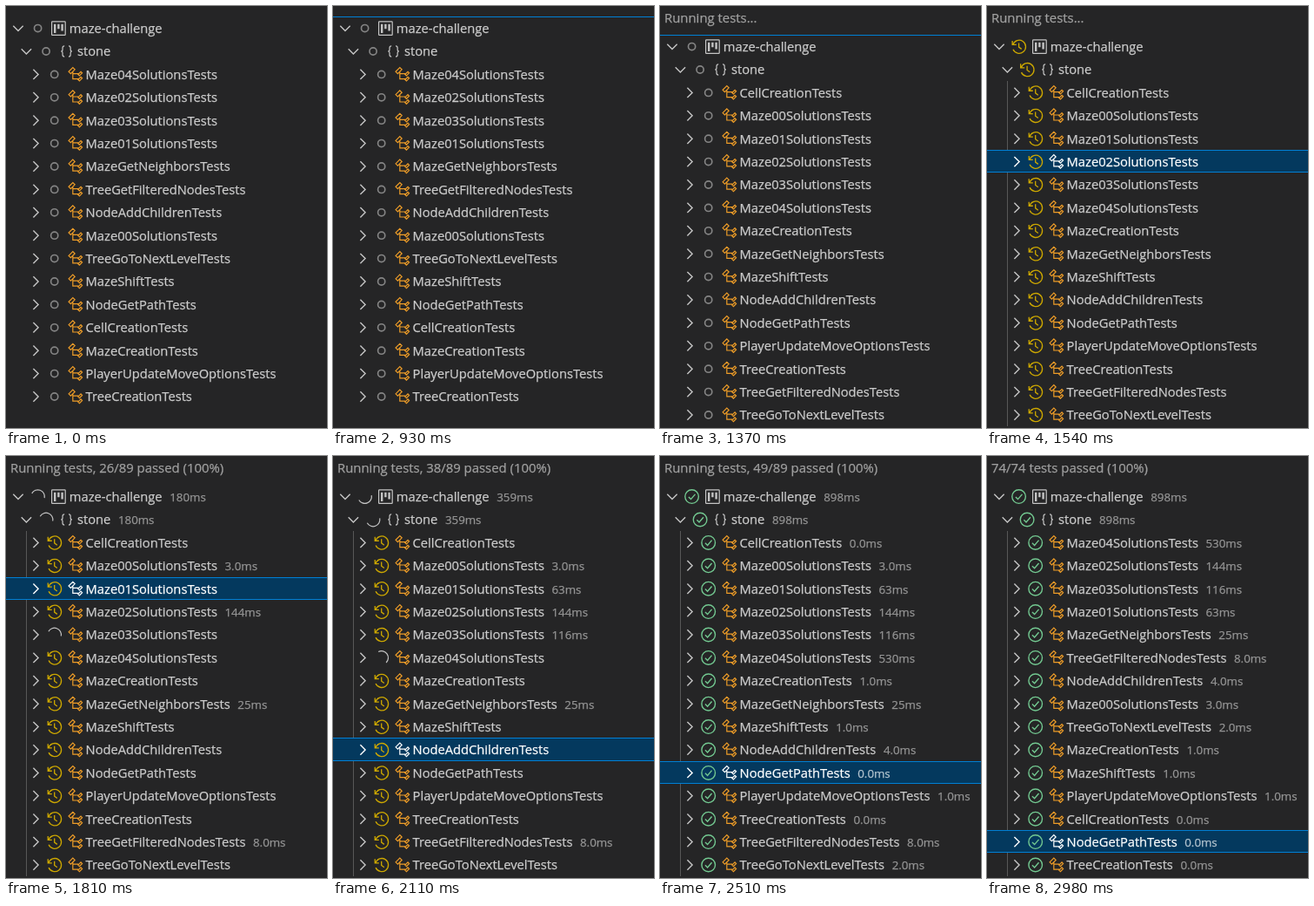
These frames come from a looping animation (369x484 px, 3.35 s). An HTML page:

```html
<!DOCTYPE html>
<html lang="en">
<head>
<meta charset="utf-8">
<title>Test explorer</title>
<style>
  html, body { margin: 0; width: 100%; height: 100%; overflow: hidden; background: #252526; }
  svg { display: block; width: 369px; height: 484px; }
  text {
    font: 14.7px "Open Sans", "Noto Sans", sans-serif; white-space: pre;
    color: #ccc; fill: currentColor; stroke: currentColor; stroke-width: .25px;
  }
  tspan { fill: currentColor; stroke: currentColor; }
  .head { font-size: 14.9px; color: #a0a0a0; }
  .time { font-size: 13.3px; color: #959595; }
  .sel text { color: #fff; }
  .sel .time { color: #b4c4cf; }
  path, circle { fill: none; stroke: #c5c5c5; }
  .class { stroke: #ee9d28; }
  .sel .class, .sel .chevron { stroke: #fff; }
  .chevron { stroke-width: 1.4; }
  .idle { stroke: #848484; stroke-width: 1.4; }
  .queued { stroke: #cca700; stroke-width: 1.1; }
  .passed { stroke: #73c991; stroke-width: 1.15; }
  .bar { fill: #04395e; }
  .focus { fill: #007fd4; }
  .guide { fill: #585858; }
  rect { shape-rendering: crispEdges; }
</style>
</head>
<body>
<svg id="stage" viewBox="0 0 369 484"></svg>
<script>
const LOOP = 3350, ROW = 26.4, TICK = 100 / 3;

// Suites in the order of their previous run time
const suites = [
  'Maze04Solutions', 'Maze02Solutions', 'Maze03Solutions', 'Maze01Solutions',
  'MazeGetNeighbors', 'TreeGetFilteredNodes', 'NodeAddChildren', 'Maze00Solutions',
  'TreeGoToNextLevel', 'MazeShift', 'NodeGetPath', 'CellCreation',
  'MazeCreation', 'PlayerUpdateMoveOptions', 'TreeCreation'
];
const byName = [...suites].sort();
const byTime = [
  ...suites.slice(0, 9), 'MazeCreation', 'MazeShift', 'PlayerUpdateMoveOptions',
  'CellCreation', 'NodeGetPath', 'TreeCreation'
];

const progress = n => `Running tests, ${n}/89 passed (100%)`;

// Each step overrides the fields of the steps before it; times add up
const steps = [
  { at: 0, order: suites, icon: 'idle', root: 'idle', top: 25.6, head: '' },
  { at: 930, line: 12 },
  { at: 1140, order: byName },
  { at: 1370, top: 46.6, line: 33, head: 'Running tests...' },
  { at: 1470, icon: 'queued', root: 'queued' },
  { at: 1510, line: 0, sel: 'Maze02Solutions' },
  { at: 1570, root: 'spin', run: 'Maze02Solutions' },
  { at: 1670, head: progress(14), sel: 'TreeGetFilteredNodes', run: 'MazeGetNeighbors',
    times: { Maze02Solutions: 144, TreeGetFilteredNodes: 8 } },
  { at: 1740, head: progress(26), sel: 'Maze01Solutions', run: 'Maze03Solutions',
    times: { MazeGetNeighbors: 25, Maze00Solutions: 3 } },
  { at: 1940, head: progress(31), sel: 'Maze03Solutions', times: { Maze01Solutions: 63 } },
  { at: 2070, head: progress(38), sel: 'NodeAddChildren', run: 'Maze04Solutions',
    times: { Maze03Solutions: 116 } },
  { at: 2210, head: progress(46), sel: 'NodeGetPath',
    times: { MazeShift: 1, NodeAddChildren: 4 } },
  { at: 2340, head: progress(49), times: { Maze04Solutions: 41 } },
  { at: 2490, icon: 'passed', root: 'passed', run: '',
    times: { Maze04Solutions: 530, TreeGoToNextLevel: 2, MazeCreation: 1,
      PlayerUpdateMoveOptions: 1, CellCreation: 0, NodeGetPath: 0, TreeCreation: 0 } },
  { at: 2530, order: byTime },
  { at: 2910, head: '74/74 tests passed (100%)' }
];

function stateAt(t) {
  const s = { times: {} };
  for (const step of steps) {
    if (step.at > t) break;
    Object.assign(s, step, { times: { ...s.times, ...step.times } });
  }
  return s;
}

// 16-unit icon grid centred on x, y
const grid = (x, y, body, turn = 0) =>
  `<g transform="translate(${x} ${y.toFixed(2)}) rotate(${turn}) scale(1.2) translate(-8 -8)">${body}</g>`;
const path = (d, cls = '') => `<path class="${cls}" d="${d}"/>`;
const rect = (cls, x, y, w, h) =>
  `<rect class="${cls}" x="${x}" y="${y}" width="${w}" height="${h}"/>`;

const icons = {
  idle: '<circle class="idle" cx="8" cy="8" r="3.4"/>',
  queued: path('M2.3 6.1A6.3 6.3 0 1 1 2.5 10.6M1.8 2.4V6.2H5.6M8 4.5V8.4L10.6 10.3', 'queued'),
  passed: '<circle class="passed" cx="8" cy="8" r="6.5"/>' + path('M4.9 8.3 7.1 10.5 11.2 5.7', 'passed'),
  spin: path('M1.58 7A6.5 6.5 0 0 1 14.42 7'),
  class: path('M1.4 5.35 5.35 1.4 7.3 3.35 3.35 7.3ZM5.35 5.4V12.35H10.6M5.35 7.35H10.6' +
    'M10.35 8.05 13.03 5.4 14.3 6.7 11.7 9.35ZM10.35 13.05 13.03 10.4 14.3 11.7 11.7 14.35Z', 'class'),
  project: path('M1.5 2.1Q1.5 1.5 2.1 1.5H13.9Q14.5 1.5 14.5 2.1V13.9Q14.5 14.5 13.9 14.5H2.1Q1.5 14.5 1.5 13.9Z') +
    '<path style="stroke-width:2" d="M4.5 4V12.5M8 4V8.5M11.5 4V10.5"/>',
  braces: path('M6 2.9Q4.2 2.9 4.2 4.6V6.3Q4.2 8 2.7 8Q4.2 8 4.2 9.7V11.4Q4.2 13.1 6 13.1' +
    'M10 2.9Q11.8 2.9 11.8 4.6V6.3Q11.8 8 13.3 8Q11.8 8 11.8 9.7V11.4Q11.8 13.1 10 13.1')
};

const down = (x, y) => path(`M${x - 5.7} ${y - 2.8}l5.7 5.7 5.7-5.7`, 'chevron');
const right = (x, y) => path(`M${x - 2.8} ${y - 5.7}l5.7 5.7-5.7 5.7`, 'chevron');

const label = (x, y, name, time = '') =>
  `<text x="${x}" y="${(y + 5.3).toFixed(2)}">${name}` +
  (time && `<tspan class="time" dx="8.6">${time}</tspan>`) + '</text>';
const short = ms => ms < 10 ? ms.toFixed(1) + 'ms' : ms + 'ms';

function draw(t) {
  const s = stateAt(t);
  const turn = Math.floor((t - 1540) / TICK) * 15.5 - 104;
  const status = (kind, x, y, offset = 0) =>
    grid(x, y, icons[kind], kind === 'spin' ? (turn + offset).toFixed(1) : 0);
  const used = Object.values(s.times).reduce((a, b) => a + b, 0);
  const total = used ? short(used) : '';
  const y0 = s.top, y1 = y0 + ROW;

  let out = s.head && `<text class="head" x="5" y="19">${s.head}</text>`;
  if (s.line) out += rect('focus', 0, s.line, 369, 1);
  if (s.sel) out += rect('guide', 23, 86, 1, 396);

  out += down(14, y0) + status(s.root, 36.6, y0) + grid(60.4, y0, icons.project) +
    label(72.8, y0, 'maze-challenge', total);
  out += down(23.4, y1) + status(s.root, 46.1, y1) + grid(69.6, y1, icons.braces) +
    label(82, y1, 'stone', total);

  s.order.forEach((name, i) => {
    const y = y1 + (i + 1) * ROW;
    const on = name === s.sel;
    const ms = s.times[name];
    if (on) {
      const a = Math.floor(y - ROW / 2), b = Math.floor(y + ROW / 2);
      out += rect('bar', 0, a, 369, b - a) + rect('focus', 0, a, 369, 1) + rect('focus', 0, b - 1, 369, 1);
    }
    out += `<g class="${on ? 'sel' : ''}">` + right(34.2, y) +
      status(name === s.run ? 'spin' : s.icon, 55.7, y, name === 'Maze04Solutions' ? -105 : 0) +
      grid(80, y, icons.class) +
      label(91.6, y, name + 'Tests', ms === undefined ? '' : short(ms)) + '</g>';
  });
  return out;
}

const stage = document.getElementById('stage');
const start = performance.now();
let last = '';

function frame() {
  const next = draw((performance.now() - start) % LOOP);
  if (next !== last) stage.innerHTML = last = next;
  requestAnimationFrame(frame);
}
frame();
</script>
</body>
</html>
```
